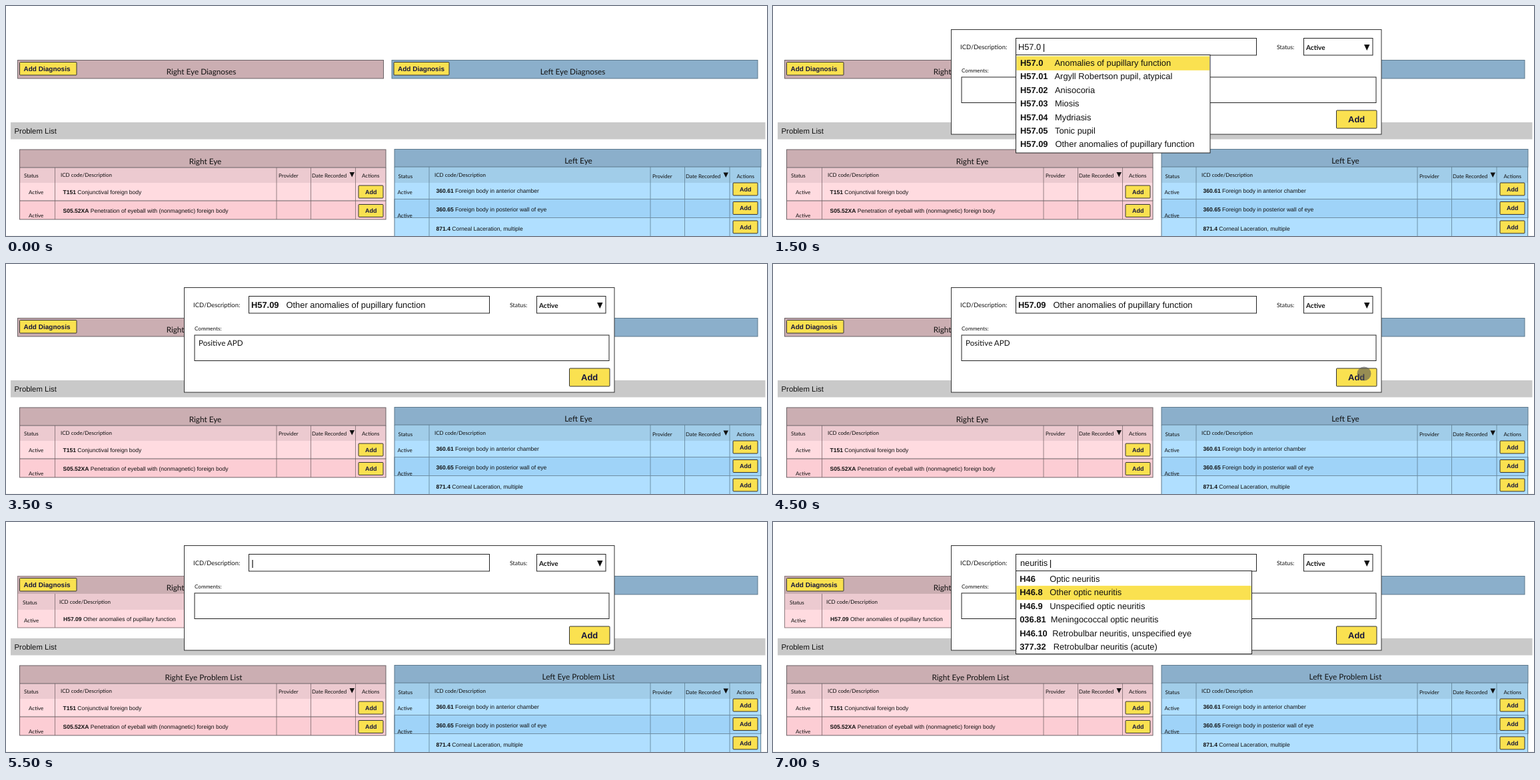
An HTML page for the animation above (8000 ms loop, 1142 by 346 pixels).

```html
<!DOCTYPE html>
<html lang="en">
<head>
<meta charset="utf-8">
<title>Eye diagnoses</title>
<style>
html, body { margin: 0; width: 100%; height: 100%; overflow: hidden; background: #fff; }
svg { display: block; width: 1142px; height: 346px; text-rendering: geometricPrecision; }
.h { font-family: "Liberation Sans", Arial, sans-serif; }
.g { font-family: Lato, "Gill Sans", sans-serif; }
.b { font-weight: bold; }
.m { text-anchor: middle; }
</style>
</head>
<body>
<svg id="stage" viewBox="0 0 1142 346"></svg>
<script>
const LOOP = 8000;
const YELLOW = '#fae150', LINE = '#6b6266';
const PINK = { head: '#cbaeb2', cols: '#eccad0', row: '#ffdbe0', alt: '#fccdd4', line: '#7d6a6e' };
const BLUE = { head: '#8bafcb', cols: '#a1cde9', row: '#b0dfff', alt: '#9fd3f8', line: '#5f7f94' };

const box = (x1, y1, x2, y2, fill, stroke = 'none', extra = '') =>
  `<rect x="${x1}" y="${y1}" width="${x2 - x1}" height="${y2 - y1}" fill="${fill}" stroke="${stroke}" ${extra}/>`;
const text = (s, x, y, size, cls = 'g', fill = '#111') =>
  `<text x="${x}" y="${y}" font-size="${size}" class="${cls}" fill="${fill}">${s}</text>`;
const line = (x1, y1, x2, y2, color = LINE, w = 1) =>
  `<path d="M${x1} ${y1}L${x2} ${y2}" stroke="${color}" stroke-width="${w}"/>`;
const arrow = (x, y, w, h) => `<path d="M${x} ${y}h${w}l${-w / 2} ${h}z" fill="#111"/>`;
const dot = (x, y) => `<circle cx="${x}" cy="${y}" r="10.5" fill="#555" fill-opacity=".6"/>`;

function button(label, x1, y1, x2, y2, tx, ty, size) {
  return box(x1, y1, x2, y2, YELLOW, '#333', 'rx="1"') + text(label, tx, ty, size, 'h b', '#15153c');
}

const entry = (code, desc, x, y) =>
  `<text x="${x}" y="${y}" font-size="8.56" class="h" fill="#111"><tspan class="b">${code}</tspan> ${desc}</text>`;

// Column labels and the rules between the columns
function columns(c, xs, labels, top, bottom, base) {
  const names = ['Status', 'ICD code/Description', 'Provider', 'Date Recorded', 'Actions'];
  return xs.map(x => line(x, top, x, bottom, c.line, .8)).join('') +
    names.map((n, i) => text(n, labels[i], base - (i === 1 ? 1.5 : 0), 8)).join('') +
    arrow(labels[3] + 56.5, base - 8, 7.5, 7.5);
}

function diagnoses(added, leftEnd) {
  let s = box(17.5, 81.5, 566.5, 109, PINK.head, LINE) + box(579, 81.5, 1128, 109, BLUE.head, '#5c788c');
  if (added) {
    s += box(17.5, 108, 566.5, 132, PINK.cols) + box(17.5, 132, 566.5, 159, PINK.row) +
      columns(PINK, [73.5, 404, 455.5, 522.5], [25, 80, 407, 457, 532], 108, 159, 124) +
      box(17.5, 81.5, 566.5, 159, 'none', '#8d7b7f') +
      text('Active', 27, 150.5, 8) +
      entry('H57.09', 'Other anomalies of pupillary function', 86, 148.5) +
      button('Edit', 528, 137, 564, 155.5, 538.5, 149, 8);
  }
  return s + text('Right Eye Diagnoses', 293, 103, 11.75, 'g m') +
    text('Left Eye Diagnoses', 850.5, 103, 11.75, 'g m') +
    button('Add Diagnosis', 20.5, 84.5, 106, 104, 26.5, 97.5, 10) +
    button('Add Diagnosis', 582, 84.5, leftEnd, 104, 588, 97.5, 10);
}

function problems(long) {
  const tail = long ? ' Problem List' : '';
  const add = (x, y) => button('Add', x, y, x + 37, y + 19, x + 10, y + 12.8, 9);
  return box(7, 175, 1139.5, 200.5, '#c9c9c9') + text('Problem List', 12.5, 192, 11.4, 'h') +
    line(0, 345.7, 1142, 345.7, '#e6e6e6', .6) +

    box(20.5, 243, 570, 266, PINK.cols) + box(20.5, 266, 570, 293, PINK.row) +
    box(20.5, 293, 570, 321, PINK.alt) +
    columns(PINK, [73.5, 406, 457.5, 524.5], [27, 82, 409, 459, 534], 243, 321, 258) +
    box(20.5, 293, 570, 321, 'none', LINE) + box(20.5, 216, 570, 243, PINK.head, LINE) +
    line(20.5, 243, 20.5, 293) + line(570, 243, 570, 293) +
    text('Right Eye' + tail, long ? 296.5 : 299, 237.5, 11.8, 'g m') +
    text('Active', 34, 283, 8) + text('Active', 34, 318, 8) +
    entry('T151', 'Conjunctival foreign body', 85.5, 282.5) +
    entry('S05.52XA', 'Penetration of eyeball with (nonmagnetic) foreign body', 85.5, 310.5) +
    add(529, 270) + add(529, 298.5) +

    box(583, 242, 1133, 266, BLUE.cols) + box(583, 266, 1133, 346, BLUE.row) +
    box(583, 290.5, 1133, 318.5, BLUE.alt) +
    columns(BLUE, [635, 967, 1018.5, 1086], [588.5, 643, 970, 1020, 1096.5], 242, 346, 258.5) +
    box(583, 290.5, 1133, 318.5, 'none', '#6f8ea3') + box(583, 215.5, 1133, 242, BLUE.head, '#5c788c') +
    line(583, 242, 583, 346, '#5c788c') + line(1132.7, 242, 1132.7, 346, '#5c788c') +
    text('Left Eye' + tail, 859, 237, 11.8, 'g m') +
    text('Active', 587.5, 282.5, 8) + text('Active', 587.5, 317.5, 8) +
    entry('360.61', 'Foreign body in anterior chamber', 645.5, 281) +
    entry('360.65', 'Foreign body in posterior wall of eye', 645.5, 309) +
    entry('871.4', 'Corneal Laceration, multiple', 645.5, 337.5) +
    add(1091, 266) + add(1091, 294.5) + add(1091, 323);
}

const PUPIL = [
  ['H57.0', 'Anomalies of pupillary function', 422.5],
  ['H57.01', 'Argyll Robertson pupil, atypical', 422.5],
  ['H57.02', 'Anisocoria', 423],
  ['H57.03', 'Miosis', 423],
  ['H57.04', 'Mydriasis', 423],
  ['H57.05', 'Tonic pupil', 423],
  ['H57.09', 'Other anomalies of pupillary function', 423.5]
];
const NEURITIS = [
  ['H46', 'Optic neuritis', 416],
  ['H46.8', 'Other optic neuritis', 416],
  ['H46.9', 'Unspecified optic neuritis', 416],
  ['036.81', 'Meningococcal optic neuritis', 417.5],
  ['H46.10', 'Retrobulbar neuritis, unspecified eye', 420],
  ['377.32', 'Retrobulbar neuritis (acute)', 421.5]
];

function menu(items, picked, right, bottom, dx) {
  const y = 75.5 + 20.4 * picked;
  return box(364.5, 73.5, right, bottom, '#fff', '#222') +
    box(365.5, y, right - 1, y + 21.3, YELLOW) +
    items.map(([code, desc, x], i) =>
      text(code, 371 + dx, 90 + 20.4 * i, 12.88, 'h b') +
      text(desc, x + dx, 90 + 20.4 * i, 12.88, 'h')).join('');
}

const caret = x => line(x, 57, x, 69, '#111', 1.2);

function dialog(field, comment = '') {
  return box(267.5, 35.5, 913, 193, '#fff', '#333') +
    text('ICD/Description:', 281, 65, 9.4) + box(364.5, 48.5, 725.5, 74, '#fff', '#222') +
    text('Status:', 756, 65, 8.9) + box(796.5, 48.5, 900, 74, '#fff', '#222') +
    text('Active', 800, 66, 10, 'g b') + arrow(887, 58, 8.5, 9) +
    text('Comments:', 283, 99.5, 8.15) + box(283, 107, 905, 145.5, '#fff', '#222') +
    text(comment, 289, 122.5, 11.65) +
    button('Add', 845.5, 157, 906, 184, 863, 175.3, 13) + field;
}

const page = (added, leftEnd = 665) => diagnoses(added, leftEnd) + problems(added);
const typed = (s, x, end) => text(s, x, 66, 12.8, 'h') + caret(end);
const pupil = typed('H57.0', 368, 406.5);
const neuritis = typed('neuritis', 371, 416.5);
const chosen = dialog(text('H57.09', 368, 66, 12.88, 'h b') +
  text('Other anomalies of pupillary function', 420.5, 66, 12.88, 'h'), 'Positive APD');

const STEPS = [
  [0, page(false)],
  [500, page(false) + dot(74, 89.5)],
  [1000, page(false) + dialog(caret(370))],
  [1500, page(false) + dialog(pupil) + menu(PUPIL, 0, 656, 221, 0)],
  [2500, page(false) + dialog(pupil) + menu(PUPIL, 6, 656, 221, 0)],
  [3500, page(false) + chosen],
  [4500, page(false) + chosen + dot(887, 165)],
  [5000, page(true, 669) + dot(74, 89.5)],
  [5500, page(true) + dialog(caret(370))],
  [6000, page(true) + dialog(neuritis) + menu(NEURITIS, 0, 719.5, 199.5, 0)],
  [7000, page(true) + dialog(neuritis) + menu(NEURITIS, 1, 718.5, 198.5, -.8)]
];

const stage = document.getElementById('stage');
const start = performance.now();
let shown;

function draw() {
  const t = (performance.now() - start) % LOOP;
  const step = STEPS.findLast(([from]) => from <= t);
  if (step !== shown) stage.innerHTML = step[1];
  shown = step;
  requestAnimationFrame(draw);
}
draw();
</script>
</body>
</html>
```
